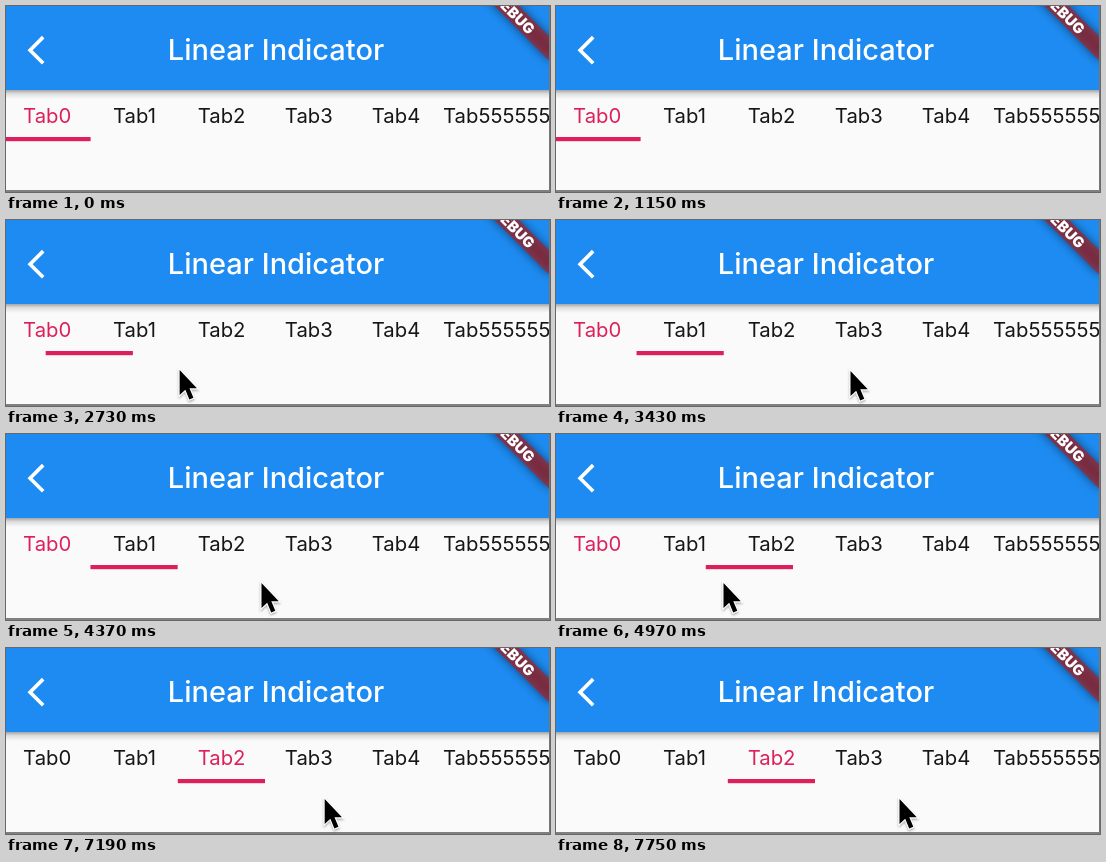
Recreate the animation shown at these times as an HTML page. Size 544 px wide and 186 px high, loop 8000 ms.

```html
<!DOCTYPE html>
<html lang="en">
<head>
<meta charset="utf-8">
<title>Linear Indicator</title>
<style>
  html, body { margin: 0; width: 100%; height: 100%; overflow: hidden; background: #fafafa; }
  svg { display: block; width: 544px; height: 186px; font-family: Inter, Roboto, sans-serif; }
  .title { font-size: 29px; font-weight: 500; fill: #fff; text-anchor: middle; }
  .tab { font-size: 20.3px; fill: #161616; text-anchor: middle; }
  .tab.active { fill: #dd1f5b; }
  .debug { font-size: 14.8px; font-weight: 900; fill: #fff; text-anchor: middle; }
</style>
</head>
<body>
<svg viewBox="0 0 544 186">
  <defs>
    <linearGradient id="fade" x2="0" y2="1">
      <stop offset="0" stop-opacity=".34"/>
      <stop offset=".4" stop-opacity=".12"/>
      <stop offset="1" stop-opacity="0"/>
    </linearGradient>
    <filter id="soft" x="-20%" y="-150%" width="140%" height="400%">
      <feGaussianBlur stdDeviation="5"/>
    </filter>
    <filter id="lift" x="-30%" y="-30%" width="160%" height="160%">
      <feDropShadow dx="0" dy="1.5" stdDeviation="1.2" flood-opacity=".35"/>
    </filter>
  </defs>

  <rect width="544" height="186" fill="#fafafa"/>
  <rect y="84" width="544" height="9" fill="url(#fade)"/>
  <rect width="544" height="84" fill="#1d8bf1"/>
  <path fill="#fff" transform="translate(21.5 26.8) scale(1.453)"
        d="M11.67 3.87 9.9 2.1 0 12l9.9 9.9 1.77-1.77L3.54 12z"/>
  <text class="title" x="270" y="54">Linear Indicator</text>

  <g id="tabs"></g>
  <rect id="bar" y="131" width="87.2" height="4.2" fill="#dd1f5b"/>

  <g transform="translate(543 -27.6) rotate(45)">
    <rect x="-58" y="40.7" width="116" height="17.4" fill-opacity=".5" filter="url(#soft)"/>
    <rect x="-58" y="40.7" width="116" height="17.4" fill="#b71c1c" fill-opacity=".63"/>
    <text class="debug" y="54.8">DEBUG</text>
  </g>

  <rect x="543" width="1" height="186" fill="#777"/>
  <rect y="184" width="544" height="2" fill="#808080"/>

  <path id="cursor" filter="url(#lift)" stroke="#fff" stroke-width="2" paint-order="stroke"
        d="M1.5 2V27L7.2 21.7 11.2 31.5 15.3 29.8 11.3 20.3H18.8Z"/>
</svg>

<script>
const LOOP = 8000, TAB_WIDTH = 87.2, FIRST_LEFT = -2.6;
const DRAG_START = [2360, 4380];
const DRAG_TIME = 160;
const SELECT_TIME = 6800;

// time, x, y of the pointer
const pointerPath = [
  [1150, 308, 190], [1550, 298, 153], [2130, 298, 153], [2250, 306, 151],
  [2380, 250, 148], [2540, 178, 148], [2720, 172, 148], [3280, 293, 149],
  [3430, 293, 149], [4110, 315, 150], [4230, 319, 150], [4370, 254, 147],
  [4540, 166, 147], [4970, 166, 147], [5720, 287, 147], [6750, 287, 147],
  [7490, 334, 150], [7750, 342, 149]
];

const tabGroup = document.getElementById('tabs');
const bar = document.getElementById('bar');
const cursor = document.getElementById('cursor');

const tabs = ['Tab0', 'Tab1', 'Tab2', 'Tab3', 'Tab4', 'Tab55555555'].map((label, i) => {
  const tab = document.createElementNS('http://www.w3.org/2000/svg', 'text');
  const last = i === 5;
  tab.setAttribute('x', last ? 437 : 41.2 + TAB_WIDTH * i);
  tab.setAttribute('y', 117);
  if (last) tab.style.textAnchor = 'start';
  tab.textContent = label;
  return tabGroup.appendChild(tab);
});

// One page swipe: a drag of one page per second, then an overdamped spring.
function swipe(ms) {
  if (ms <= 0) return 0;
  if (ms < DRAG_TIME) return ms / 1000;
  const s = (ms - DRAG_TIME) / 1000;
  return 1 - 1.234 * Math.exp(-3.6 * s) + 0.394 * Math.exp(-8.74 * s);
}

function pointerAt(t) {
  const next = pointerPath.findIndex(key => key[0] > t);
  if (next === 0) return pointerPath[0].slice(1);
  if (next < 0) return pointerPath.at(-1).slice(1);
  const [t0, ...from] = pointerPath[next - 1];
  const [t1, ...to] = pointerPath[next];
  const u = (t - t0) / (t1 - t0);
  const eased = u * u * (3 - 2 * u);
  return from.map((v, i) => v + (to[i] - v) * eased);
}

function draw(now) {
  const t = now % LOOP;
  const page = DRAG_START.reduce((sum, start) => sum + swipe(t - start), 0);
  bar.setAttribute('x', FIRST_LEFT + TAB_WIDTH * page);

  const selected = t < SELECT_TIME ? 0 : 2;
  tabs.forEach((tab, i) => tab.setAttribute('class', i === selected ? 'tab active' : 'tab'));

  const [x, y] = pointerAt(t);
  cursor.setAttribute('transform', `translate(${x} ${y})`);
  cursor.setAttribute('visibility', y < 186 ? 'visible' : 'hidden');
}

const begin = performance.now();
function tick() {
  draw(performance.now() - begin);
  requestAnimationFrame(tick);
}
tick();
</script>
</body>
</html>
```
